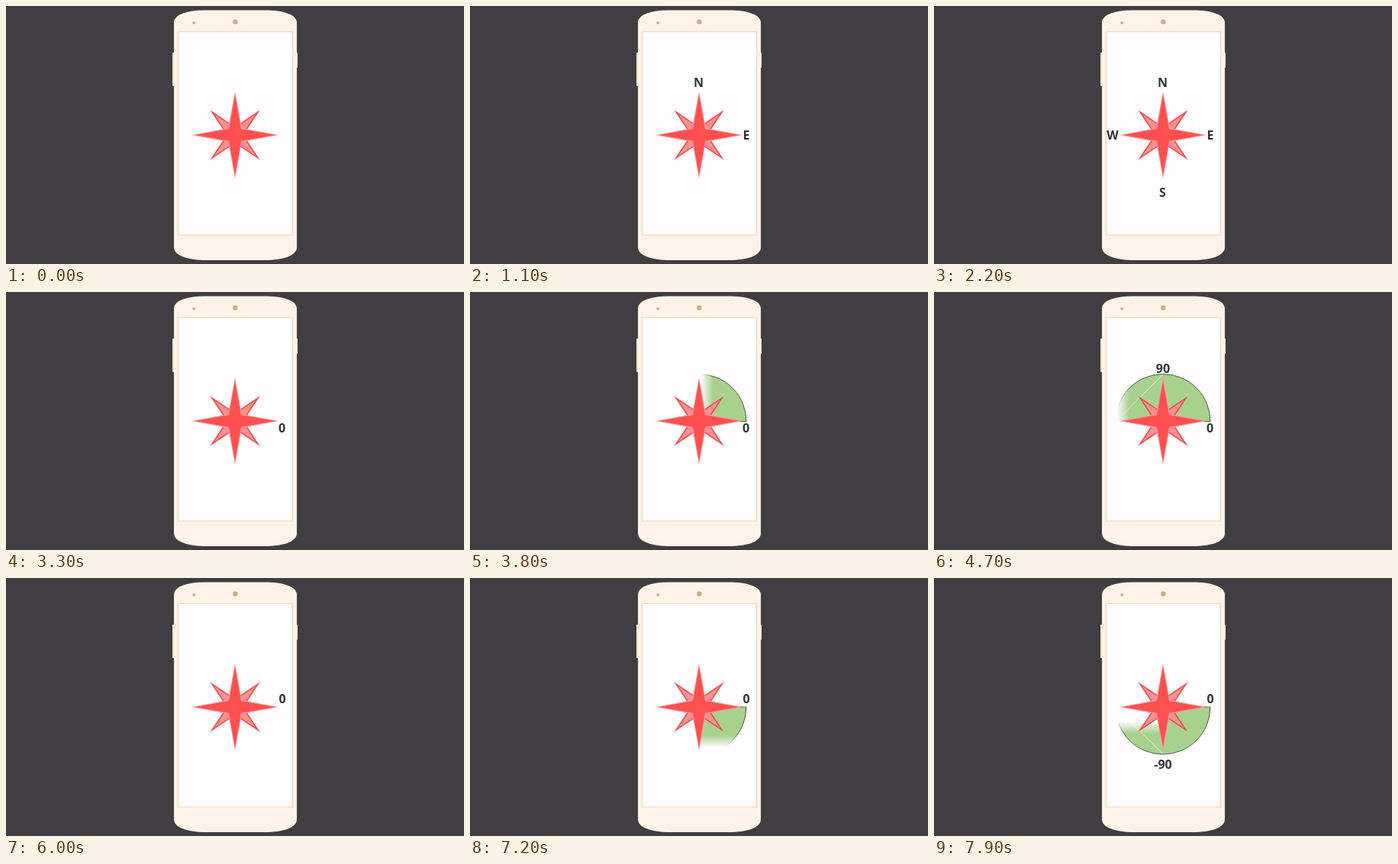
An HTML page that plays this animation: 600 by 338 pixels, repeating every 8 s.

```html
<!DOCTYPE html>
<html lang="en">
<head>
<meta charset="utf-8">
<title>Compass angles</title>
<style>
  html, body { margin: 0; width: 100%; height: 100%; overflow: hidden; background: #403e40; }
  svg { display: block; width: 600px; height: 338px; }
  text { font: bold 16px "Open Sans", "Noto Sans", sans-serif; fill: #333; text-anchor: middle; }
  [data-show] { opacity: 0; }
  .arc { fill: #a9d18e; stroke: #2f3a2a; stroke-width: .8; }
  .body { fill: #fff3e8; }
  .button { fill: #fde3cf; }
  .lens { fill: #d6ab80; }
</style>
</head>
<body>
<svg viewBox="0 0 600 338">
  <defs>
    <linearGradient id="soft">
      <stop offset=".84" stop-color="#fff"/>
      <stop offset="1" stop-color="#fff" stop-opacity="0"/>
    </linearGradient>
    <mask id="m1" maskUnits="userSpaceOnUse" x="0" y="0" width="600" height="338">
      <g transform="translate(362.5) scale(-1 1)"><rect data-wipe="3415"/></g>
    </mask>
    <mask id="m2" maskUnits="userSpaceOnUse" x="0" y="0" width="600" height="338">
      <g transform="translate(300) scale(-1 1)"><rect data-wipe="4315"/></g>
    </mask>
    <mask id="m3" maskUnits="userSpaceOnUse" x="0" y="0" width="600" height="338">
      <g transform="translate(0 169) rotate(90)"><rect data-wipe="6860"/></g>
    </mask>
    <mask id="m4" maskUnits="userSpaceOnUse" x="0" y="0" width="600" height="338">
      <g transform="translate(0 231.5) rotate(-90)"><rect data-wipe="7620"/></g>
    </mask>
  </defs>

  <rect width="600" height="338" fill="#403e40"/>
  <rect class="button" x="218" y="61" width="4" height="44" rx="1"/>
  <rect class="button" x="378" y="61" width="4" height="20" rx="1"/>
  <path class="body" d="M220 22C220 11 238 5.500 262 5.500H339C363 5.500 381 11 381 22V316C381 327 363 333 339 333H262C238 333 220 327 220 316Z"/>
  <circle class="lens" cx="246.300" cy="22" r="1.900"/>
  <circle class="lens" cx="300.300" cy="20.800" r="3.200"/>
  <rect x="225.500" y="33.700" width="150" height="266.300" fill="#fffdff" stroke="#f3cfae"/>

  <g data-show="2400 6000">
    <g mask="url(#m1)"><path class="arc" d="M300 169.500H362A62 62 0 0 0 300 107.500"/></g>
    <g mask="url(#m2)"><path class="arc" d="M300 107.500A62 62 0 0 0 238 169.500" /><path fill="#a9d18e" d="M300.300 108V169.500H238.500Z"/></g>
  </g>
  <g data-show="6000 8000">
    <g mask="url(#m3)"><path class="arc" d="M300 169H362A62 62 0 0 1 300 231"/></g>
    <g mask="url(#m4)"><path class="arc" d="M300 231A62 62 0 0 1 238 169"/><path fill="#a9d18e" d="M300.300 230.500V169H238.500Z"/></g>
  </g>

  <g transform="translate(300 169)" stroke-linejoin="miter" stroke-miterlimit="12">
    <path d="M30 -30L10 0L30 30L0 10L-30 30L-10 0L-30 -30L0 -10Z" fill="#ff8f8f" stroke="#ee4b4b" stroke-width="1.500"/>
    <path d="M0 -57L9 -9L57 0L9 9L0 57L-9 9L-57 0L-9 -9Z" fill="#fa9494"/>
    <path d="M0 -52L7.800 -7.800L52 0L7.800 7.800L0 52L-7.800 7.800L-52 0L-7.800 -7.800Z" fill="#ff5050"/>
  </g>

  <text x="299.500" y="106" data-show="500 2400">N</text>
  <text x="362" y="175" data-show="1000 2400">E</text>
  <text x="299.500" y="250" data-show="1400 2400">S</text>
  <text x="234" y="175" data-show="1800 2400">W</text>
  <text x="361.500" y="183.500" data-show="2400 6000">0</text>
  <text x="300" y="106" data-show="4100 6000">90</text>
  <text x="239" y="183.500" data-show="5000 6000">180</text>
  <text x="362" y="163.500" data-show="6000 8000">0</text>
  <text x="300" y="250" data-show="7500 8000">-90</text>
</svg>
<script>
  const LOOP = 8000, WIPE = 500, TRAVEL = 78;
  const all = (sel, fn) => document.querySelectorAll(sel).forEach(fn);
  const play = (el, frames) => {
    el.animate(frames, { duration: LOOP, iterations: Infinity }).startTime = document.timeline.currentTime;
  };

  all('[data-show]', el => {
    const [on, off] = el.dataset.show.split(' ').map(t => t / LOOP);
    const easing = 'step-end';
    const frames = [{ opacity: 0, offset: 0, easing }, { opacity: 1, offset: on, easing }];
    if (off < 1) frames.push({ opacity: 0, offset: off, easing });
    frames.push({ opacity: off < 1 ? 0 : 1, offset: 1 });
    play(el, frames);
  });

  // Each soft edge sweeps along its own local x axis.
  all('[data-wipe]', el => {
    const start = +el.dataset.wipe;
    const at = (x, offset) => ({ transform: `translateX(${x}px)`, offset });
    const size = { x: -100, y: -500, width: 100, height: 1000, fill: 'url(#soft)' };
    for (const k in size) el.setAttribute(k, size[k]);
    const end = Math.min(start + WIPE, LOOP);
    const far = TRAVEL * (end - start) / WIPE;
    const frames = [at(0, 0), at(0, start / LOOP), at(far, end / LOOP)];
    if (end < LOOP) frames.push(at(far, 1));
    play(el, frames);
  });
</script>
</body>
</html>
```
